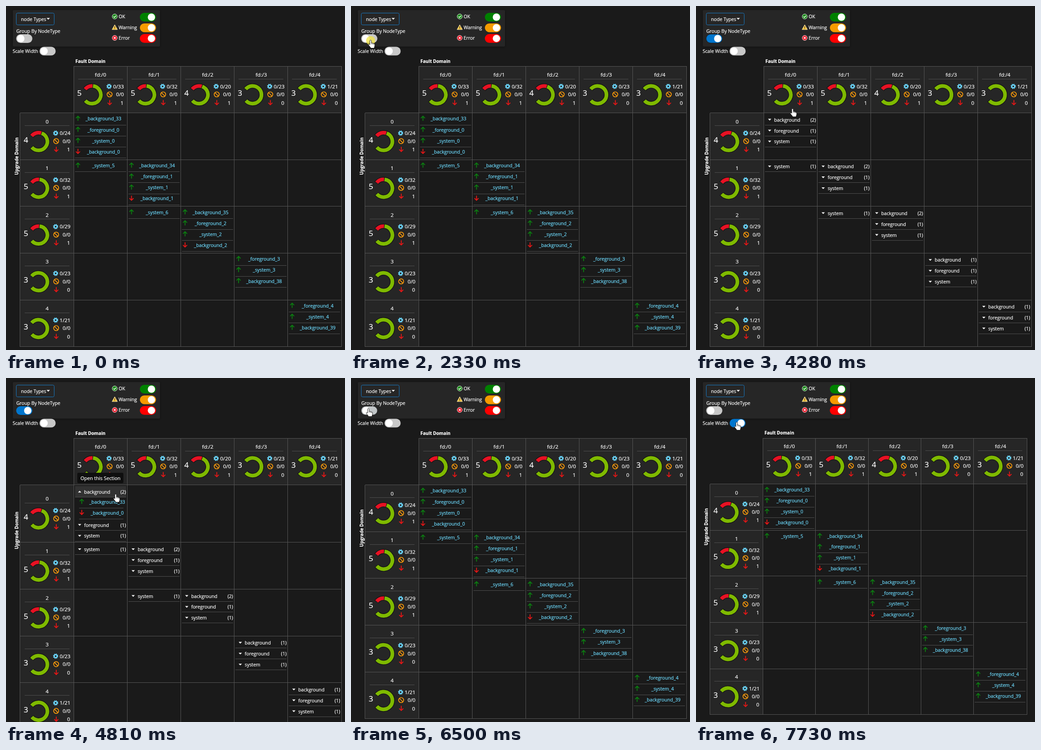
Animation, 742 px wide and 755 px high, one loop 8000 ms. Source, as an HTML page:

```html
<!DOCTYPE html>
<html lang="en">
<head>
<meta charset="utf-8">
<title>Cluster map</title>
<style>
html, body { margin: 0; width: 100%; height: 100%; overflow: hidden; background: #1a1a1a; }
svg { display: block; width: 742px; height: 755px; font: 10.3px "Open Sans", "Noto Sans", sans-serif; fill: #fff; }
text { fill: #fff; stroke: #fff; stroke-width: .22px; }
.ln { shape-rendering: crispEdges; }
.mid { text-anchor: middle; }
.end { text-anchor: end; }
.name { fill: #6edcff; stroke: #6edcff; text-anchor: middle; }
</style>
</head>
<body>
<svg id="stage" viewBox="0 0 742 755" xmlns="http://www.w3.org/2000/svg"></svg>
<script>
const LOOP = 8000, COL = 117.2, ROW = 102.6, LEFT = 148, TOP = 132, GROW = 23.7;
const GREEN = '#7fba00', RED = '#e81123', BORDER = '#555', RULE = '#4e4e4e';
const KINDS = { b: 'background', f: 'foreground', s: 'system' };

// nodes, load, down
const domains = [[5, '0/33', 1], [5, '0/32', 1], [4, '0/20', 1], [3, '0/23', 0], [3, '1/21', 0]];
const upgrades = [[4, '0/24', 1], [5, '0/32', 1], [5, '0/29', 1], [3, '0/23', 0], [3, '1/21', 0]];
// row, column, nodes
const cells = [
  [0, 0, 'b33 f0 s0 b0'], [1, 0, 's5'], [1, 1, 'b34 f1 s1 b1'], [2, 1, 's6'],
  [2, 2, 'b35 f2 s2 b2'], [3, 3, 'f3 s3 b38'], [4, 4, 'f4 s4 b39']
].map(([r, c, list]) => [r, c, list.split(' ')]);

const text = (x, y, s, cls = '', more = '') => `<text x="${x}" y="${y}" class="${cls}" ${more}>${s}</text>`;
const rect = (x, y, w, h, fill, more = '') =>
  `<rect x="${x}" y="${y}" width="${w}" height="${h}" fill="${fill}" ${more}/>`;
const hline = (x, y, w, c = RULE) => rect(Math.floor(x), Math.floor(y), w, 1, c, 'class="ln"');
const vline = (x, y, h) => rect(Math.floor(x), y, 1, h, BORDER, 'class="ln"');
const path = (d, stroke, width, more = '') =>
  `<path d="${d}" fill="none" stroke="${stroke}" stroke-width="${width}" ${more}/>`;

function arrow(x, y, up) {
  const s = up ? 1 : -1;
  return path(`M0 ${5.5 * s}V${-4.5 * s}M-4.5 ${-.3 * s}L0 ${-4.8 * s}L4.5 ${-.3 * s}`,
    up ? '#0b7f10' : '#ee1616', 1.8, `transform="translate(${x} ${y})"`);
}

function caret(x, y, up) {
  const s = up ? -1 : 1;
  return `<path d="M${x - 3.6} ${y - 1.8 * s}h7.2l-3.6 ${3.8 * s}z"/>`;
}

function arc(cx, cy, from, to, color, width) {
  const p = a => {
    const k = (a - 90) * Math.PI / 180;
    return (cx + 19.4 * Math.cos(k)).toFixed(2) + ' ' + (cy + 19.4 * Math.sin(k)).toFixed(2);
  };
  return path(`M${p(from)}A19.4 19.4 0 ${to - from > 180 ? 1 : 0} 1 ${p(to)}`, color, width);
}

function donut(cx, cy, total, down) {
  const start = -51, end = 229, split = start + (end - start) * down / total;
  let out = arc(cx, cy, start - 3, end + 3, '#161616', 11);
  if (down) out += arc(cx, cy, start, split - 1.7, RED, 8);
  return out + arc(cx, cy, down ? split + 1.7 : start, end, GREEN, 8);
}

const gear = (x, y) =>
  `<g fill="none" stroke="#6bd6fb"><circle cx="${x}" cy="${y}" r="3.2" stroke-width="2.5"/>` +
  `<circle cx="${x}" cy="${y}" r="4.8" stroke-width="1.8" stroke-dasharray="2.1 1.67"/></g>`;

const ban = (x, y) =>
  `<g fill="none" stroke="#ff9d0a" stroke-width="1.7"><circle cx="${x}" cy="${y}" r="5.5"/>` +
  `<path d="M${x - 4} ${y - 4}l8 8"/></g>`;

function summary(x, y, label, [total, load, down]) {
  const big = 'font-size="11.3"';
  return text(x + 59, y + 23, label, 'mid', 'font-size="11.5"') +
    hline(x + 10, y + 28, 98) +
    text(x + 12.6, y + 65, total, 'mid', 'font-size="17"') +
    donut(x + 40.2, y + 62.8, total, down) +
    gear(x + 77.6, y + 44.4) + ban(x + 78.8, y + 62) + arrow(x + 79, y + 80, false) +
    text(x + 110, y + 48.6, load, 'end', big) +
    text(x + 110, y + 66.2, '0/0', 'end', big) +
    text(x + 109.3, y + 84.5, down, 'end', big);
}

function node(x, y, id) {
  const up = !/^b\d$/.test(id);
  return arrow(x, y - .8, up) + text(x + 55.8, y + 4, `_${KINDS[id[0]]}_${id.slice(1)}`, 'name');
}

function flatCell(x, y, list) {
  return list.map((id, k) => node(x + 9.5, y + 12.8 + 24.15 * k, id) +
    hline(x + 3, y + 26.6 + 24.15 * k, 112)).join('');
}

function groupCell(x, y, list, open) {
  let out = '', at = y;
  for (const key of 'bfs') {
    const items = list.filter(id => id[0] === key);
    if (!items.length) continue;
    const wide = open && key === 'b';
    out += caret(x + 13.2, at + 14.8, wide) + text(x + 23, at + 19, KINDS[key]) +
      text(x + 114.5, at + 19, `(${items.length})`, 'end') + hline(x + 3, at + 26.6, 112);
    if (wide) {
      items.forEach((id, k) => {
        out += node(x + 17.8, at + 36.9 + 24.2 * k, id) + hline(x + 12, at + 50.6 + 24.2 * k, 97);
      });
      at += 49;
    }
    at += 23.9;
  }
  return out;
}

function body(mode) {
  const open = mode === 'open', extra = open ? GROW : 0;
  const rowY = r => TOP + ROW * (r + 1) + (r ? extra : 0);
  let out = rect(31, rowY(0), 117, ROW * 5 + extra, '#262626');
  upgrades.forEach((u, r) => { out += summary(31, rowY(r) + (r ? 0 : extra / 2), r, u); });
  for (let r = 0; r < 6; r++) out += hline(31, rowY(r), 704, BORDER);
  for (let c = 0; c < 6; c++) out += vline(LEFT + COL * c, TOP, rowY(5) - TOP);
  out += vline(30, rowY(0), rowY(5) - rowY(0));
  for (const [r, c, list] of cells) {
    const x = LEFT + COL * c, y = rowY(r);
    out += mode === 'flat' ? flatCell(x, y, list) : groupCell(x, y, list, open && !r && !c);
  }
  const mid = open ? 334.5 : 329.5;
  out += text(0, 0, 'Upgrade Domain', 'mid',
    `font-size="9.85" font-weight="700" transform="translate(26.8 ${mid}) rotate(-90)"`);
  return `<g id="${mode}">${out}</g>`;
}

function toggle(id, cx, cy, color, on) {
  const pill = 'x="-17.7" y="-9.6" width="35.4" height="19.2" rx="9.6"';
  return `<g id="${id}" transform="translate(${cx} ${cy})"><rect class="pill" ${pill} fill="${color}"/>` +
    `<rect class="ring" ${pill} fill="none" stroke="#1a1a1a" stroke-width="1.4" stroke-dasharray="1.6 1.6" visibility="hidden"/>` +
    `<circle class="knob" cx="${on ? 7.6 : -7.6}" r="8" fill="#fff"/></g>`;
}

function panel() {
  return rect(15, 9, 322, 80, '#262626', 'rx="2" filter="url(#soft)"') +
    rect(22.5, 15.5, 83, 26, 'none', 'rx="3" stroke="#1678c2"') +
    text(33, 32.8, 'node Types') + caret(92.5, 28, false) +
    text(22.5, 58.7, 'Group By NodeType') + text(14.5, 102.7, 'Scale Width') +
    text(246.5, 27, 'OK') + text(246.5, 50.7, 'Warning') + text(246.5, 74, 'Error') +
    '<circle cx="238" cy="23" r="5.5" fill="#1b8a1b" stroke="#dfeedd"/>' + path('M235.3 23l2 2.2 3.6-4', '#fff', 1.5) +
    '<path d="M238 41.2l5.9 10.6h-11.8z" fill="#ffc83d" stroke="#fff0c8" stroke-width=".8"/>' +
    path('M238 44.6v3.6M238 49.3v1.2', '#222', 1.3) +
    '<circle cx="238" cy="70" r="5.5" fill="#e81123" stroke="#f6dada"/>' + path('M235.8 67.8l4.4 4.4m0-4.4l-4.4 4.4', '#fff', 1.4) +
    toggle('okSw', 310.7, 24.5, '#008000', true) +
    toggle('warnSw', 310.7, 47.8, '#f59b00', true) +
    toggle('errSw', 310.7, 71.2, '#ff0000', true) +
    toggle('groupSw', 40, 71.5, '#ccc', false) +
    toggle('scaleSw', 91, 99, '#ccc', false);
}

const hand = 'M-1.7 1.5C-1.7-.5 1.7-.5 1.7 1.5V6.2C2.5 5.6 4.2 5.8 4.4 7C5.2 6.3 6.7 6.7 6.9 7.9C8 7.4 9 8.1 9 9.3V12.5C9 14.5 7.8 15.5 7.6 17.5H.3C0 15.7-2.2 14-4.3 10.8C-5.4 9-3.6 7.9-2.4 9.2L-1.7 10Z';

const $ = id => document.getElementById(id);
$('stage').innerHTML =
  '<defs><filter id="soft" x="-10%" y="-20%" width="120%" height="140%"><feDropShadow dx="0" dy="1" stdDeviation="3" flood-color="#000" flood-opacity=".4"/></filter></defs>' +
  rect(0, 0, 742, 755, '#1a1a1a') + panel() +
  '<g id="table">' +
  text(152, 124.6, 'Fault Domain', '', 'font-size="9.8" font-weight="700"') +
  rect(LEFT, TOP, COL * 5, ROW, '#262626') + hline(LEFT, TOP, 587, BORDER) +
  domains.map((d, c) => summary(LEFT + COL * c, TOP, 'fd:/' + c, d)).join('') +
  rect(151, 237, 112, 25, '#323232', 'id="hover"') +
  ['flat', 'group', 'open'].map(body).join('') +
  '<g id="tip">' + rect(156, 208, 101, 23, '#0f0f0f', 'rx="3"') +
  text(206.7, 223.6, 'Open this Section', 'mid', 'font-size="10.7"') + '</g></g>' +
  '<circle id="glow" r="10" fill="#f3e545"/>' +
  `<g id="hand"><path d="${hand}" stroke="#111" stroke-width=".9"/>` + path('M1.7 6.2V9M4.4 7V9.4M6.9 7.9V9.8', '#222', .8) + '</g>';

// time, x, y of the fingertip
const track = [
  [500, -8, 114], [1230, 43, 75], [3669, 43, 75], [3670, 114, 126], [3859, 114, 126],
  [4470, 240, 255], [5150, 240, 255], [5920, 41, 75], [5980, 38, 67], [6830, 38, 67],
  [7120, 86, 97], [7430, 86, 97], [7600, 89, 97]
];
const clicks = [[2330, 2560], [4690, 4800], [6130, 6380], [7310, 7560]];

const within = (t, a, b) => t >= a && t < b;
const ramp = (t, a, d) => {
  const u = Math.min(1, Math.max(0, (t - a) / d));
  return u * u * (3 - 2 * u);
};
const show = (id, on) => $(id).setAttribute('visibility', on ? 'visible' : 'hidden');

function cursorAt(t) {
  if (t < track[0][0]) return [-40, 114];
  const i = track.findIndex(k => k[0] > t);
  if (i < 0) return track[track.length - 1].slice(1);
  const [a, x, y] = track[i - 1], [b, X, Y] = track[i], u = ramp(t, a, b - a);
  return [x + (X - x) * u, y + (Y - y) * u];
}

function setToggle(id, on, focus) {
  const part = c => $(id).querySelector(c), mix = (a, b) => Math.round(a + (b - a) * on);
  part('.pill').setAttribute('fill', `rgb(${mix(200, 0)},${mix(200, 118)},${mix(200, 206)})`);
  part('.knob').setAttribute('cx', -7.6 + 15.2 * on);
  part('.ring').setAttribute('visibility', focus ? 'visible' : 'hidden');
}

function draw(t) {
  const grouped = within(t, 2440, 6250), open = within(t, 4810, 6250);
  const hover = within(t, 4380, 5250), scaled = t >= 7430;
  show('flat', !grouped);
  show('group', grouped && !open);
  show('open', open);
  show('hover', hover);
  show('tip', hover);
  $('table').setAttribute('transform', scaled ? 'translate(0 1.52) scale(.9862)' : '');
  setToggle('groupSw', ramp(t, 2440, 280) - ramp(t, 6250, 280),
    within(t, 2440, 4690) || within(t, 6250, 7310));
  setToggle('scaleSw', ramp(t, 7430, 270), scaled);

  const [x, y] = cursorAt(t);
  $('hand').setAttribute('transform', `translate(${x.toFixed(2)} ${y.toFixed(2)})`);
  const press = clicks.find(([a, b]) => within(t, a, b));
  show('glow', !!press);
  if (press) {
    $('glow').setAttribute('cx', x);
    $('glow').setAttribute('cy', y + 1);
    $('glow').setAttribute('opacity', .75 * (1 - ramp(t, press[0] + 110, press[1] - press[0] - 110)));
  }
}

const begin = performance.now();
function tick() {
  draw((performance.now() - begin) % LOOP);
  requestAnimationFrame(tick);
}
tick();
</script>
</body>
</html>
```
